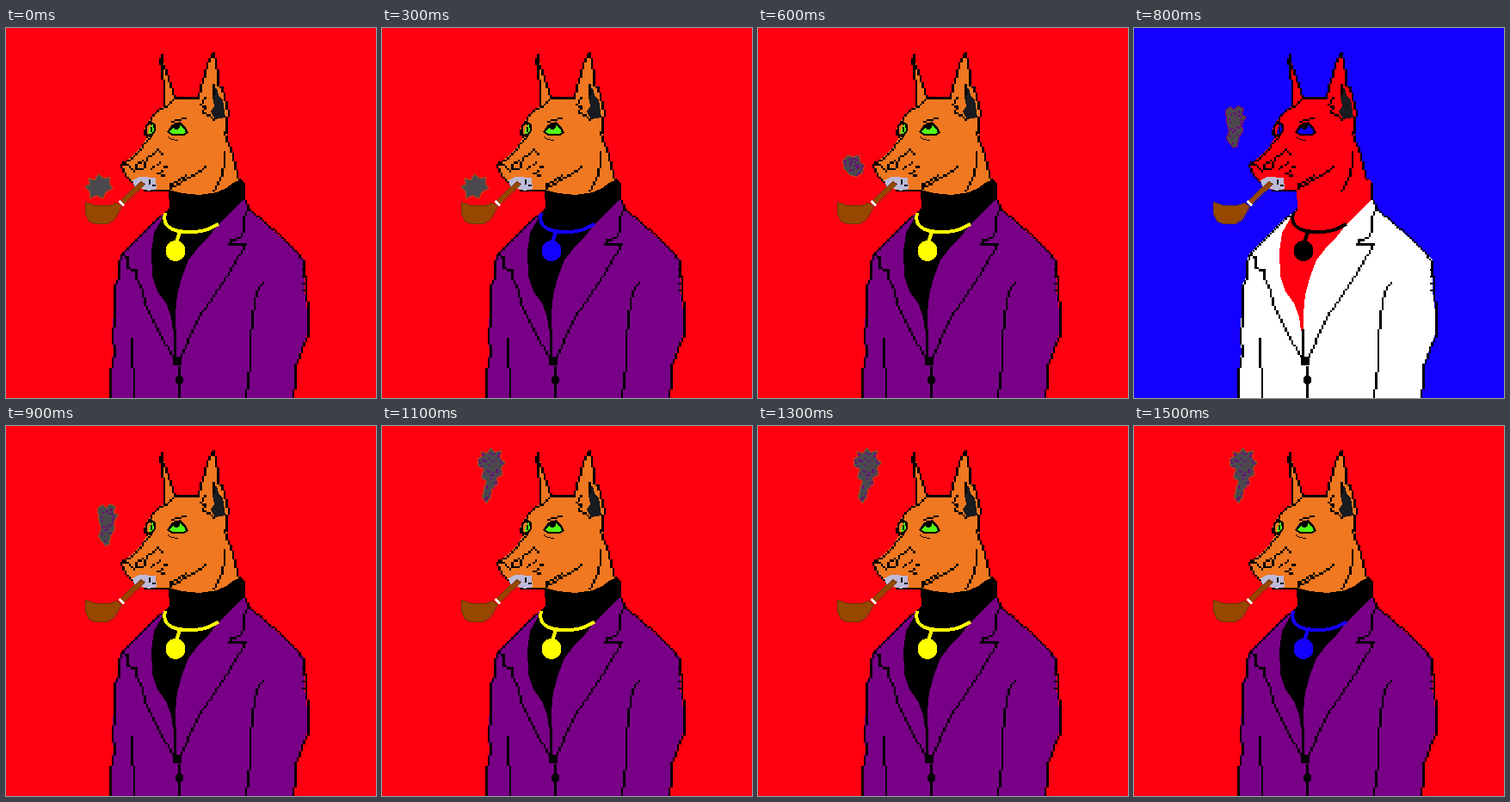
An HTML page that plays this animation: 430 by 430 pixels, repeating every 1.6 s.

```html
<!DOCTYPE html>
<html lang="en">
<head>
<meta charset="utf-8">
<title>Hound with a pipe</title>
<style>
  html, body { margin: 0; width: 100%; height: 100%; overflow: hidden; background: #ff0010; }
  svg {
    display: block; width: 100vw; height: 100vh; shape-rendering: crispEdges;
    --jacket: #780086; --chain: #ffff00;
    animation: negative 1.6s step-end infinite, jacket 1.6s step-end infinite, chain 1.6s step-end infinite;
  }
  .bg { fill: var(--bg); }
  .skin { fill: var(--skin); }
  .knit { fill: var(--knit); }
  .jacket { fill: var(--jacket); }
  .iris { fill: var(--iris); }
  .chain { fill: var(--chain); }
  .chain-line { fill: none; stroke: var(--chain); stroke-width: 4; }
  .ink { fill: #000; }
  .ear { fill: #181c20; }
  .muzzle { fill: #bcbad8; }
  .wood { fill: #964800; }
  .wood-edge { fill: #6a380c; }
  .smoke { opacity: 0; animation: 1.6s step-end infinite; }
  .smoke polygon { fill: #4b494d; }
  .rim { fill: var(--rim); }
  .fleck { fill: #6c087c; }
  #puff1 { animation-name: puff1; }
  #puff2 { animation-name: puff2; }
  #puff3 { animation-name: puff3; }
  #puff4 { animation-name: puff4; }

  @keyframes negative {
    0%, 56.25%, 100% { --bg: #ff0010; --skin: #f07820; --knit: #000; --iris: #55ff18; --rim: #b65018; }
    50% { --bg: #1400ff; --skin: #ff0010; --knit: #ff0010; --iris: #1400ff; --rim: #8c0064; }
  }
  @keyframes jacket {
    0%, 37.5%, 56.25%, 81.25%, 93.75%, 100% { --jacket: #780086; }
    31.25%, 75%, 87.5% { --jacket: #0008ff; }
    50% { --jacket: #fff; }
  }
  @keyframes chain {
    0%, 25%, 56.25%, 100% { --chain: #ffff00; }
    18.75%, 93.75% { --chain: #1400ff; }
    50% { --chain: #000; }
  }
  @keyframes puff1 { 0% { opacity: 1; } 37.5%, 100% { opacity: 0; } }
  @keyframes puff2 { 0%, 50%, 100% { opacity: 0; } 37.5% { opacity: 1; } }
  @keyframes puff3 { 0%, 68.75%, 100% { opacity: 0; } 50% { opacity: 1; } }
  @keyframes puff4 { 0% { opacity: 0; } 68.75%, 100% { opacity: 1; } }
</style>
</head>
<body>
<svg viewBox="0 0 430 430">
  <rect class="bg" width="430" height="430"/>

  <!-- head -->
  <path class="skin" d="M181 31L187 55 191 66 195 76 197 82 224 80 226 66 230 58 233 46 237 36 241 29 244 42 246 56 248 67 252 69 254 82 259 96 256 116 257 130 262 142 266 157 269 170 273 180 274 197 250 200 190 200 189 188 162 189 147 180 137 168 135 158 148 148 158 137 163 128 161 117 166 107 183 91 183 60Z"/>
  <path class="ear" d="M241 70L245 70 247 78 252 84 255 104 243 106 238 97 242 91 240 80Z"/>
  <polyline class="ink" points="183,91 183,62 181,58 181,46 178,42 178,36 181,30 182,40 186,52 188,58 191,66 194,73 196,81 224,80"/>
  <polyline class="ink" points="224,80 226,66 229,60 231,50 234,44 236,36 241,28 243,42 246,54 247,66 251,69 253,82 257,90 259,98 256,106 255,116 257,120 254,122 257,132 262,142 263,151 267,158 269,170 272,180"/>
  <polyline class="ink" points="197,82 186,90 178,94 170,102 165,108 160,118 162,124 166,128 159,136 156,142 148,148 138,156 134,158 136,166 140,173 146,178 150,180"/>
  <polyline class="ink" points="232,80 227,88 232,92 229,99 236,102 240,105"/>
  <polyline class="ink" points="241,66 240,76"/>
  <polyline class="ink" points="254,144 253,156 250,168 245,178 240,188"/>
  <polyline class="ink" points="160,188 188,188 192,184 200,182 206,177 214,174 220,168 230,162"/>
  <polyline class="ink" points="192,180 200,176 208,172"/>
  <polyline class="ink" points="136,157 144,161 148,166"/>
  <polyline class="ink" points="158,154 152,158 152,164 158,164 160,158"/>
  <polyline class="ink" points="160,155 166,148 172,146 177,141 182,147"/>
  <polyline class="ink" points="168,164 172,161"/>
  <polyline class="ink" points="177,158 179,157"/>
  <polyline class="ink" points="183,161 185,162"/>
  <polyline class="ink" points="176,168 180,167"/>
  <polyline class="ink" points="182,172 184,172"/>

  <!-- eyes -->
  <path class="ink" d="M162 113L168 108 174 112 174 119 169 128 163 125Z"/>
  <path class="skin" d="M164 115L167 111 169 114 166 125 164 122Z"/>
  <path class="iris" d="M168 114L171 112 172 119 168 124 166 121Z"/>
  <rect class="ink" x="168" y="115" width="2" height="6"/>
  <path class="ink" d="M187 121L193 112 202 109 208 114 212 122 207 125 193 125Z"/>
  <path class="iris" d="M190 121L194 116 203 113 208 119 209 122 205 123 194 123Z"/>
  <ellipse class="ink" cx="198" cy="114" rx="4" ry="4"/>
  <polyline class="ink" data-size="2" points="193,109 199,106 208,104"/>
  <polyline class="ink" data-size="1" points="188,126 192,129 199,130"/>

  <!-- jacket and sweater -->
  <path class="jacket" d="M188 212L170 226 152 245 134 262 132 268 130 290 126 298 125 330 123 360 125 376 122 400 120 430H334L336 410 338 390 344 372 350 356 350 330 347 306 347 270 334 256 318 242 300 226 284 212 276 196Z"/>
  <path class="knit" d="M189 188L205 192 225 194 245 191 256 186 264 180 273 176 276 178 275 200 260 216 247 228 236 242 222 257 212 270 205 288 199 310 197 332 197 352 194 352 192 336 186 320 176 306 170 288 169 260 172 238 184 217 190 209Z"/>
  <polyline class="ink" points="188,212 170,226 152,245 134,264 132,276 130,292 126,298 125,330 123,360 125,376 122,400 120,429"/>
  <polyline class="ink" points="275,182 275,199 284,212 300,226 318,242 334,256 347,270 348,304 350,330 350,356 344,370 340,380 337,394 336,410 334,429"/>
  <polyline class="ink" points="134,264 140,266 142,278 151,280 152,290 158,305 162,322 172,342 182,360 194,382 198,388"/>
  <polyline class="ink" points="281,208 277,222 275,235 272,243 260,246 259,250 278,251 272,264 264,276 250,296 240,312 224,336 214,356 206,376 199,387"/>
  <polyline class="ink" points="196,350 197,384"/>
  <polyline class="ink" points="299,296 293,302 288,316 286,335 284,360 284,390 280,408 278,429"/>
  <polyline class="ink" points="146,362 147,392 149,402 149,429"/>
  <polyline class="ink" points="202,394 202,429"/>
  <polyline class="ink" data-size="2" points="344,280 347,280"/>
  <polyline class="ink" data-size="2" points="344,288 347,288"/>
  <polyline class="ink" data-size="2" points="344,296 347,296"/>
  <polyline class="ink" data-size="2" points="344,304 347,304"/>
  <rect class="ink" x="194" y="382" width="10" height="10"/>
  <circle class="ink" cx="201.5" cy="409" r="5"/>

  <!-- necklace -->
  <path class="chain-line" d="M185 215C181 230 192 237 213 237S237 232 247 228M202 237L198 249"/>
  <ellipse class="chain" cx="197" cy="259" rx="11.5" ry="12"/>

  <!-- pipe -->
  <path class="muzzle" d="M147 177L155 173 174 174 175 187 166 189 149 184Z"/>
  <polyline class="ink" data-size="2" points="166,176 166,180"/>
  <polyline class="ink" data-size="2" points="170,182 172,182"/>
  <path class="wood" d="M92 202L104 206 120 206 128 203 134 207 131 213 126 222 118 227 104 227 96 224 92 216ZM131 203L138 195 150 184 157 178 161 181 152 190 142 199 136 207Z"/>
  <polyline class="wood-edge" data-size="1" points="92,202 104,206 120,206 128,203 134,207 131,213 126,222 118,227 104,227 96,224 92,216 92,202"/>
  <polyline class="wood-edge" data-size="1" points="135,198 150,184 157,178 161,181 152,190 140,202"/>
  <path d="M130 202L132 200 138 205 136 207Z" fill="#fff"/>

  <g class="smoke" id="puff1" data-flecks="0"><polygon points="91,184 97,181 95,174 103,176 107,169 113,174 120,173 120,181 124,186 116,190 112,198 105,194 97,198 97,190"/></g>
  <g class="smoke" id="puff2" data-flecks="22"><polygon points="98,153 104,148 112,149 117,147 118,155 123,159 121,168 115,172 107,171 103,167 99,163"/></g>
  <g class="smoke" id="puff3" data-flecks="26"><polygon points="106,95 112,91 116,95 120,90 127,93 125,100 130,103 125,112 126,120 121,128 120,137 115,139 110,133 107,128 110,119 107,109"/></g>
  <g class="smoke" id="puff4" data-flecks="55"><polygon points="111,38 116,35 114,29 122,31 126,25 131,30 138,28 137,37 143,42 138,49 140,56 133,60 134,67 127,73 126,83 121,90 116,83 118,73 121,64 115,59 118,50 111,46"/></g>
</svg>
<script>
const svg = document.querySelector('svg');

const block = (x, y, size) => `M${x} ${y}h${size}v${size}h${-size}z`;

function addPath(parent, className, d) {
  const path = document.createElementNS(svg.namespaceURI, 'path');
  path.setAttribute('class', className);
  path.setAttribute('d', d);
  parent.append(path);
  return path;
}

// Turns a list of corners into a staircase of square blocks.
function staircase(points, size) {
  const cells = [...points].map(p => [Math.floor(p.x / size), Math.floor(p.y / size)]);
  let d = '';
  for (let i = 1; i < cells.length; i++) {
    const [x, y] = cells[i - 1];
    const dx = cells[i][0] - x, dy = cells[i][1] - y;
    const steps = Math.max(Math.abs(dx), Math.abs(dy), 1);
    for (let s = 0; s <= steps; s++) {
      d += block(Math.round(x + dx * s / steps) * size, Math.round(y + dy * s / steps) * size, size);
    }
  }
  return d;
}

for (const line of document.querySelectorAll('polyline')) {
  const d = staircase(line.points, Number(line.dataset.size || 2.5));
  line.replaceWith(addPath(line.parentNode, line.getAttribute('class'), d));
}

let seed = 7;
const random = () => (seed = seed * 16807 % 2147483647) / 2147483647;

for (const puff of document.querySelectorAll('.smoke')) {
  const shape = puff.firstElementChild;
  const corners = [...shape.points];
  const box = shape.getBBox();
  const spot = svg.createSVGPoint();
  let flecks = '';
  for (let i = 0; i < puff.dataset.flecks * 2; i++) {
    spot.x = Math.floor(box.x + random() * box.width);
    spot.y = Math.floor(box.y + random() * box.height);
    if (shape.isPointInFill(spot)) flecks += block(spot.x, spot.y, 2);
  }
  addPath(puff, 'fleck', flecks);
  addPath(puff, 'rim', staircase([...corners, corners[0]], 1));
}
</script>
</body>
</html>
```
